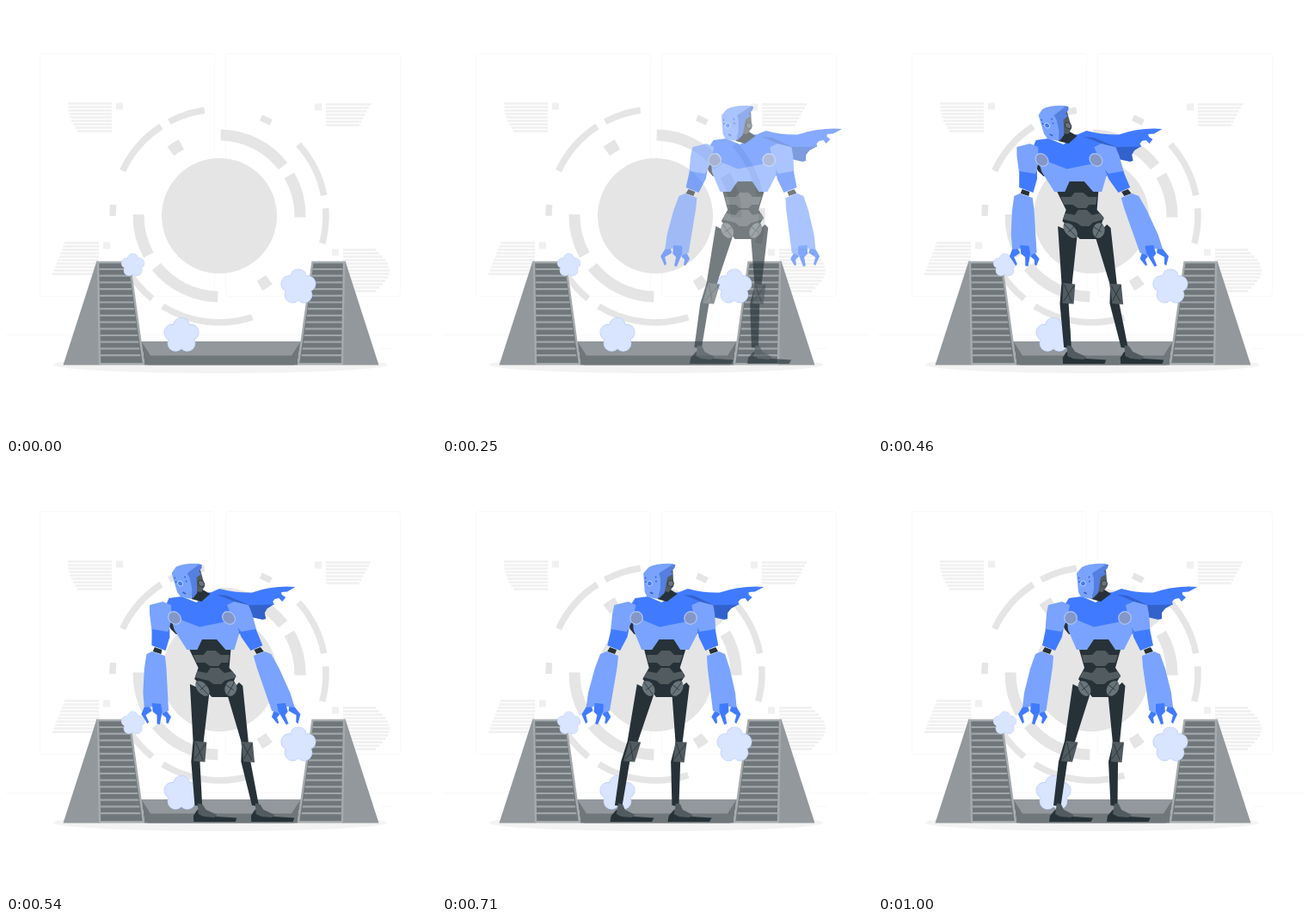
Write an HTML page that moves like this. It is 500 px wide and 500 px high and loops after 1.04 s.

```html
<!DOCTYPE html>
<html lang="en">
<head>
<meta charset="utf-8">
<title>Robot arrival</title>
<style>
html, body { margin: 0; width: 100%; height: 100%; overflow: hidden; background: #fff; }
svg { display: block; width: 100vw; height: 100vh; }
.light { fill: #79a3ff; }
.blue { fill: #407bff; }
.deep { fill: #3362cc; }
.dark { fill: #263238; }
.plate { fill: #515b60; }
.joint { fill: #68747a; }
.line { fill: none; stroke: #263238; stroke-width: .8; }
.side { fill: #92989c; }
.panel { fill: #70777a; stroke: #a5abae; stroke-width: 2.4; }
</style>
</head>
<body>
<svg viewBox="0 0 500 500">
  <g fill="none" stroke="#f9f9f9">
    <rect x="39.500" y="55.500" width="203" height="282" rx="3"/>
    <rect x="255.500" y="55.500" width="203" height="282" rx="3"/>
    <path d="M0 382.500H497M434 398.500H448"/>
  </g>
  <g id="notes" fill="#f0f0f0" stroke="#f0f0f0" stroke-width="2.300"></g>
  <g id="rings" fill="none" stroke="#e5e5e5"></g>
  <circle cx="248" cy="244" r="67" fill="#e5e5e5"/>
  <ellipse cx="249" cy="417" rx="194" ry="10" fill="#f3f3f3"/>

  <path class="side" d="M155 390H345L335 417.500H165Z"/>
  <path fill="#70777a" d="M158 391L168 406.500H332L342 391L339 417.500H161Z"/>
  <g id="ramp">
    <path class="side" d="M105.500 296.500L66.500 417.500H109L107 297Z"/>
    <path class="panel" d="M107 298H143.500L160 416.200H109Z"/>
    <path id="steps" stroke="#a0a6a9" stroke-width="2.200"/>
  </g>
  <use href="#ramp" transform="matrix(-1 0 0 1 500 0)"/>
  <g id="clouds"></g>

  <g id="robot">
    <!-- cape -->
    <path class="deep" d="M266 151L284 149L318 161L343 163L334 168L330 173L330 180L326 181L313 178L290 163Z"/>
    <path class="blue" d="M268 151L283 145Q301 150 320 149.500Q346 141 371.500 143L361 148.500L354 149L354 152L358 155L353 160L350 156L345 157L342 160L343 163.500L314 164L290 153Z"/>
    <!-- legs -->
    <path class="dark" d="M226.500 256L247 266L228 326L220 347L212.500 398L204 397L210 346L217 322ZM267.500 268L284 254L287.500 258L281 324L279 347L278.500 398L270.500 397L268 346L273 325Z"/>
    <g id="foot">
      <path class="dark" d="M199 416L200 409L206 402L227 410L250 411.500L247.500 416Z"/>
      <path class="plate" d="M206 407L208 394.500L213 395.500L216 402L228 408L224 411L212 410Z"/>
    </g>
    <use href="#foot" x="67"/>
    <path class="plate" d="M219 322L232.500 323.500L226 346.500L213 345.500ZM272.500 323L286 323.500L283.500 347L271 346Z"/>
    <path class="line" d="M220 324L224 344M231 325L215 343M274 325L281 344M285 325L272 343"/>
    <!-- torso -->
    <path class="dark" d="M214 183H298L302 190L295 198H222L217 192Z"/>
    <path class="light" d="M219 170L296 168L299 190L286 216H231L221 193Z"/>
    <path class="dark" d="M251 204H268L276 216H282L276 237L282 246L268 271H249L233 250L240 237L234 216H243Z"/>
    <path class="plate" d="M237 222H249L254 217H264L269 222H279L276 231H268L264 235H254L249 231H239ZM238 241L249 243L254 237H264L269 243L279 241L282 248L268 252L263 256H254L249 252L234 248Z"/>
    <g id="hip">
      <ellipse class="joint" cx="240" cy="261" rx="6.500" ry="9.500" transform="rotate(-32 240 261)"/>
      <path class="line" d="M234 253L245 268M246 256L237 263"/>
    </g>
    <use href="#hip" transform="matrix(-1 0 0 1 513 0)"/>
    <path class="blue" d="M217 164L222 156L237 154L253 161L270 149L286 155L302 162L292 176L279 184L251 189.500L233 182L220 171Z"/>
    <g id="arm">
      <path class="light" d="M198 164L214 160L223 164L219 183L213 196L194.500 193L196 174Z"/>
      <path class="blue" d="M195 192L213 195L216 190L214 201L206 217L191 211Z"/>
      <path class="dark" d="M194 213L202 216L200 221L191 218Z"/>
      <path class="blue" d="M169 281L163 291L168 302L170 300L168 292L176 287L174 281ZM192 285L197 294L192 302L190 301L191 295L187 291Z"/>
      <path class="light" d="M183 221L190 218L204 223L203 236L195.500 287L187 290L180 282L168 283L170 266L177 238Z"/>
      <path class="blue" d="M178 278L188 279L188 288L182 303L179 302L181 292L177 288Z"/>
      <circle cx="224" cy="179" r="7.300" fill="#8497c7" stroke="#b0c6f5" stroke-width="1.200"/>
    </g>
    <use href="#arm" transform="matrix(-1 0 0 1 511 0)"/>
    <!-- head -->
    <path class="dark" d="M254 143L263 146L271 151L259 160L248 157Z"/>
    <path class="plate" d="M256 128L265 122L266.500 142L261 149L254 148Z"/>
    <circle cx="263" cy="139" r="3.500" fill="#68747a" stroke="#263238" stroke-width=".8"/>
    <path fill="#557fe0" d="M248 127L262 116L268 117L267 121L263 125L265 128L259 132L256 150L249 157Z"/>
    <path class="light" d="M231 127L237 120Q247 115 266 116L249 127L251 133V146L248 157L236 154.500L233 149Z"/>
    <circle cx="238.500" cy="139" r="3" fill="#407bff" stroke="#c6d7ff" stroke-width=".9"/>
    <path stroke="#3362cc" stroke-width="1.800" stroke-linecap="round" d="M233.500 132.500v.1M245.500 131.500v.1M246 136.500v.1M234 137v.1M240 149.500l2 1"/>
  </g>
</svg>
<script>
const $ = id => document.getElementById(id);

// Rows of text run from a straight edge; lengths go from a to b with a bulge between
function note(edge, top, dir, rows, a, b, bulge = 0) {
  let d = '';
  for (let i = 0; i < rows; i++) {
    const u = i / (rows - 1);
    const length = a + (b - a) * u + bulge * Math.sin(Math.PI * u);
    d += `M${edge} ${top + i * 4}h${dir * length}`;
  }
  const x = dir < 0 ? edge + 5 : edge - 13;
  return `<path d="${d}"/><rect x="${x}" y="${top - 1}" width="8" height="8" stroke="none"/>`;
}
$('notes').innerHTML = note(123, 113.5, -1, 9, 51, 40, 3) + note(372, 114.5, 1, 7, 52, 39)
  + note(108, 275.5, -1, 10, 40, 54) + note(392, 283.5, 1, 13, 38, 38, 16);

function arc(r, from, to) {
  const point = deg => {
    const a = deg * Math.PI / 180;
    return `${248 + r * Math.cos(a)} ${244 + r * Math.sin(a)}`;
  };
  return `M${point(from)}A${r} ${r} 0 0 1 ${point(to)}`;
}
function ring(r, width, spans) {
  return `<path stroke-width="${width}" d="${spans.map(s => arc(r, ...s)).join('')}"/>`;
}
$('rings').innerHTML =
  ring(94, 13, [[-127, -118], [-89, -38], [-30, 1], [52, 60], [91, 141], [151, 181]]) +
  ring(124, 7.5, [[-180, -174], [-155, -123], [-118, -98], [-67, -61], [-42, -11], [-4, 15], [72, 122], [129, 147]]);

let steps = '';
for (let y = 306; y < 412; y += 7.7) steps += `M108.500 ${y}H${142 + (y - 297) * .13}`;
$('steps').setAttribute('d', steps);

// Five overlapping lobes, outlined first and then filled as one shape
let lobes = '<circle r="13"/>';
for (let i = 0; i < 5; i++) {
  const a = (i * 72 - 90) * Math.PI / 180;
  lobes += `<circle cx="${11.5 * Math.cos(a)}" cy="${11.5 * Math.sin(a)}" r="9"/>`;
}
const cloud = (x, y, size) =>
  `<g transform="translate(${x} ${y}) scale(${size})" fill="#d9e4ff">
     <g stroke="#b3caff" stroke-width="1.200">${lobes}</g>${lobes}</g>`;
$('clouds').innerHTML = cloud(147.5, 301.5, .66) + cloud(204, 383, 1) + cloud(340, 326.5, 1);

// Overshooting cubic Bezier (.36, -.01, .5, 1.38)
function ease(x) {
  const curve = (a, b, s) => 3 * (1 - s) ** 2 * s * a + 3 * (1 - s) * s * s * b + s ** 3;
  let lo = 0, hi = 1;
  for (let i = 0; i < 24; i++) {
    const mid = (lo + hi) / 2;
    if (curve(.36, .5, mid) < x) lo = mid; else hi = mid;
  }
  return curve(-.01, 1.38, lo);
}

// Slide in while leaning, then settle in two smaller swings
function pose(ms) {
  let shift = 0, angle = 0, alpha = 1;
  if (ms < 600) {
    const p = ease(ms / 600);
    shift = 250 * (1 - p);
    angle = -20 + 30 * p;
    alpha = p < .04 ? 0 : Math.min(1, p);
  } else if (ms < 800) {
    angle = 10 - 12 * ease((ms - 600) / 200);
  } else if (ms < 1000) {
    angle = -2 + 2 * ease((ms - 800) / 200);
  }
  const k = Math.tan(angle * Math.PI / 180);
  $('robot').setAttribute('transform', `matrix(1 0 ${k} 1 ${shift - 266 * k} 0)`);
  $('robot').setAttribute('opacity', alpha);
}

// The motion advances in 24 steps per second
const start = performance.now();
function draw() {
  const t = (performance.now() - start) % 1040;
  const step = Math.min(24, Math.floor((t + 5) / 41.6));
  pose(step * 1000 / 24 + 17);
  requestAnimationFrame(draw);
}
draw();
</script>
</body>
</html>
```
